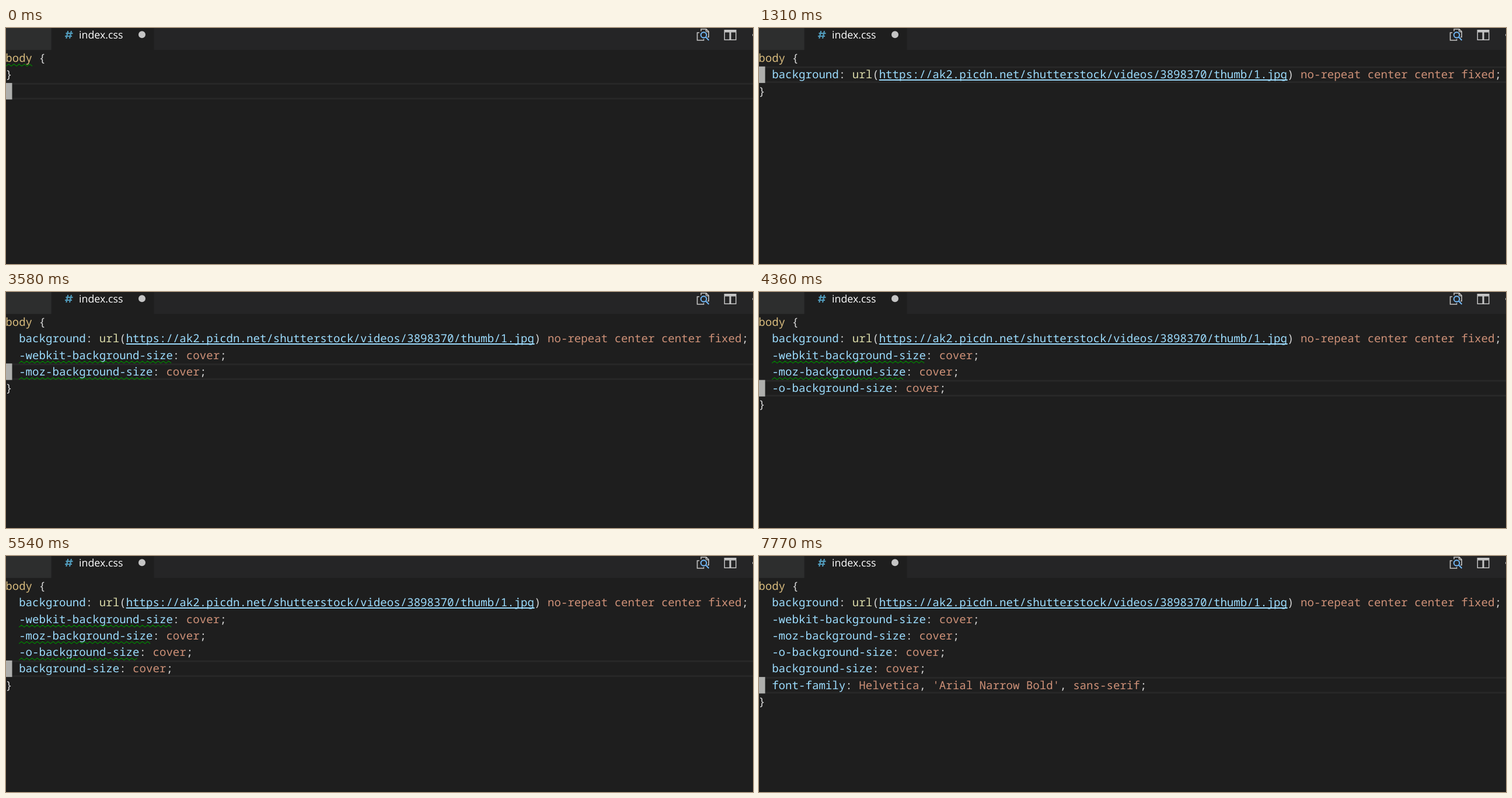
An HTML page for the animation above (8000 ms loop, 1280 by 404 pixels).

```html
<!DOCTYPE html>
<html lang="en">
<head>
<meta charset="utf-8">
<title>index.css</title>
<style>
  html, body { margin: 0; width: 100%; height: 100%; overflow: hidden; background: #1e1e1e; }
  svg { display: block; width: 1280px; height: 404px; }
  text { white-space: pre; text-rendering: geometricPrecision; fill: #d4d4d4; }
  #code { font: 19.12px "Noto Sans Mono", monospace; }
  .title { font: 17.8px "Open Sans", sans-serif; fill: #fff; }
  .selector { fill: #d7ba7d; }
  .prop, .url { fill: #9cdcfe; }
  .func { fill: #dcdcaa; }
  .value { fill: #ce9178; }
  .squiggle { fill: none; stroke: #008000; stroke-width: 1.3; }
  .icon { fill: none; stroke: #c5c5c5; stroke-width: 1.6; }
  .lens { stroke: #75beff; stroke-width: 1.9; }
</style>
</head>
<body>
<svg viewBox="0 0 1280 404">
  <rect width="1280" height="37.5" fill="#252526"/>
  <rect width="77" height="37.5" fill="#2d2e2e"/>
  <rect x="78.5" width="175" height="38" fill="#1e1e1e"/>
  <path d="M106.3 5L103.3 18M112 5L109 18M102.5 9.2H114.5M101 14H113" stroke="#519aba" stroke-width="2.2"/>
  <text class="title" x="125" y="18.2">index.css</text>
  <circle cx="233" cy="11.2" r="6" fill="#c5c5c5"/>
  <g class="icon">
    <path d="M1188 8H1184.5V21H1195.5V18.5M1191 5.5V2H1200L1204 6V15.5H1202M1199.5 2V6.5H1204"/>
    <circle cx="1195.5" cy="12" r="7" fill="#252526" stroke="none"/>
    <path class="lens" d="M1199 15.5L1204.3 21"/>
    <circle class="lens" cx="1195.5" cy="12" r="4.8"/>
  </g>
  <path d="M1230.5 3h21v18h-21zM1232 7.5v12h7.5v-12zM1242.5 7.5v12h7.5v-12z" fill="#c5c5c5" fill-rule="evenodd"/>
  <rect x="1279" y="10.5" width="1" height="3" fill="#c5c5c5"/>
  <g id="highlight" fill="#282828">
    <rect width="1280" height="2.8"/>
    <rect y="25.4" width="1280" height="2.8"/>
  </g>
  <g id="code"></g>
  <rect id="cursor" width="10.5" height="28.25" fill="#aeafad"/>
</svg>
<script>
const LOOP = 8000, LEFT = -0.8, COL = 11.474, TOP = 37.6, ROW = 28.25;
const $ = id => document.getElementById(id);
const rowTop = row => TOP + row * ROW;
const baseline = row => rowTop(row) + 20.6;
const colX = col => LEFT + col * COL;
const show = (el, on) => el.setAttribute('visibility', on ? 'visible' : 'hidden');

const span = (kind, text) => `<tspan class="${kind}">${text}</tspan>`;
const rule = (name, value) => span('prop', name) + ': ' + value + ';';
const cover = name => rule(name, span('value', 'cover'));
const url = 'https://ak2.picdn.net/shutterstock/videos/3898370/thumb/1.jpg';

// Each line: time it appears, time the cursor reaches it, markup
const lines = [
  [390, 390, rule('background', span('func', 'url') + '(' + span('url', url) + ') ' +
    span('value', 'no-repeat center center fixed'))],
  [1770, 1770, cover('-webkit-background-size')],
  [3110, 3200, cover('-moz-background-size')],
  [4360, 4360, cover('-o-background-size')],
  [5450, 5540, cover('background-size')],
  [6850, 6850, rule('font-family', span('value', 'Helvetica') + ', ' +
    span('value', "'Arial Narrow Bold'") + ', ' + span('value', 'sans-serif'))]
];

// Row, first column, length, start, end
const squiggles = [
  [0, 0, 4, 0, 790],
  [2, 2, 23, 2170, 5830],
  [3, 2, 20, 3580, 5830],
  [4, 2, 18, 4760, 5830]
];
const cursorOff = [[870, 1310], [2330, 2790], [3660, 4120], [4820, 5280], [6000, 6460], [7310, 7770]];

const code = $('code');
function add(markup) {
  code.insertAdjacentHTML('beforeend', markup);
  return code.lastElementChild;
}
const addText = (col, row, markup) =>
  add(`<text x="${colX(col)}" y="${baseline(row)}">${markup}</text>`);

function addSquiggle(row, col, length) {
  const y = rowTop(row) + 24.2, end = colX(col + length);
  let points = '';
  for (let x = Math.max(0, colX(col)), i = 0; x <= end; x += 4.5, i++)
    points += `${x},${y + (i % 2 ? 0 : 3.4)} `;
  return add(`<polyline class="squiggle" points="${points}"/>`);
}

addText(0, 0, span('selector', 'body') + ' {');
const lineEls = lines.map(([, , markup], i) => addText(2, i + 1, markup));
const brace = addText(0, 1, '}');
const link = add(`<rect class="url" x="${colX(18)}" y="88" width="${url.length * COL}" height="2"/>`);
const squiggleEls = squiggles.map(s => addSquiggle(...s));

function draw(t) {
  const count = lines.filter(l => t >= l[0]).length;
  const row = lines.filter(l => t >= l[1]).length || 2;
  lineEls.forEach((el, i) => show(el, i < count));
  brace.setAttribute('y', baseline(count + 1));
  show(link, t >= 1310);
  squiggleEls.forEach((el, i) => show(el, t >= squiggles[i][3] && t < squiggles[i][4]));
  // Row 2 is reached twice: before the first line is pasted and after the second
  $('highlight').setAttribute('transform', `translate(0 ${rowTop(row)})`);
  $('cursor').setAttribute('y', rowTop(row));
  show($('cursor'), !cursorOff.some(([from, to]) => t >= from && t < to));
}

const start = performance.now();
function tick() {
  draw((performance.now() - start) % LOOP);
  requestAnimationFrame(tick);
}
tick();
</script>
</body>
</html>
```
